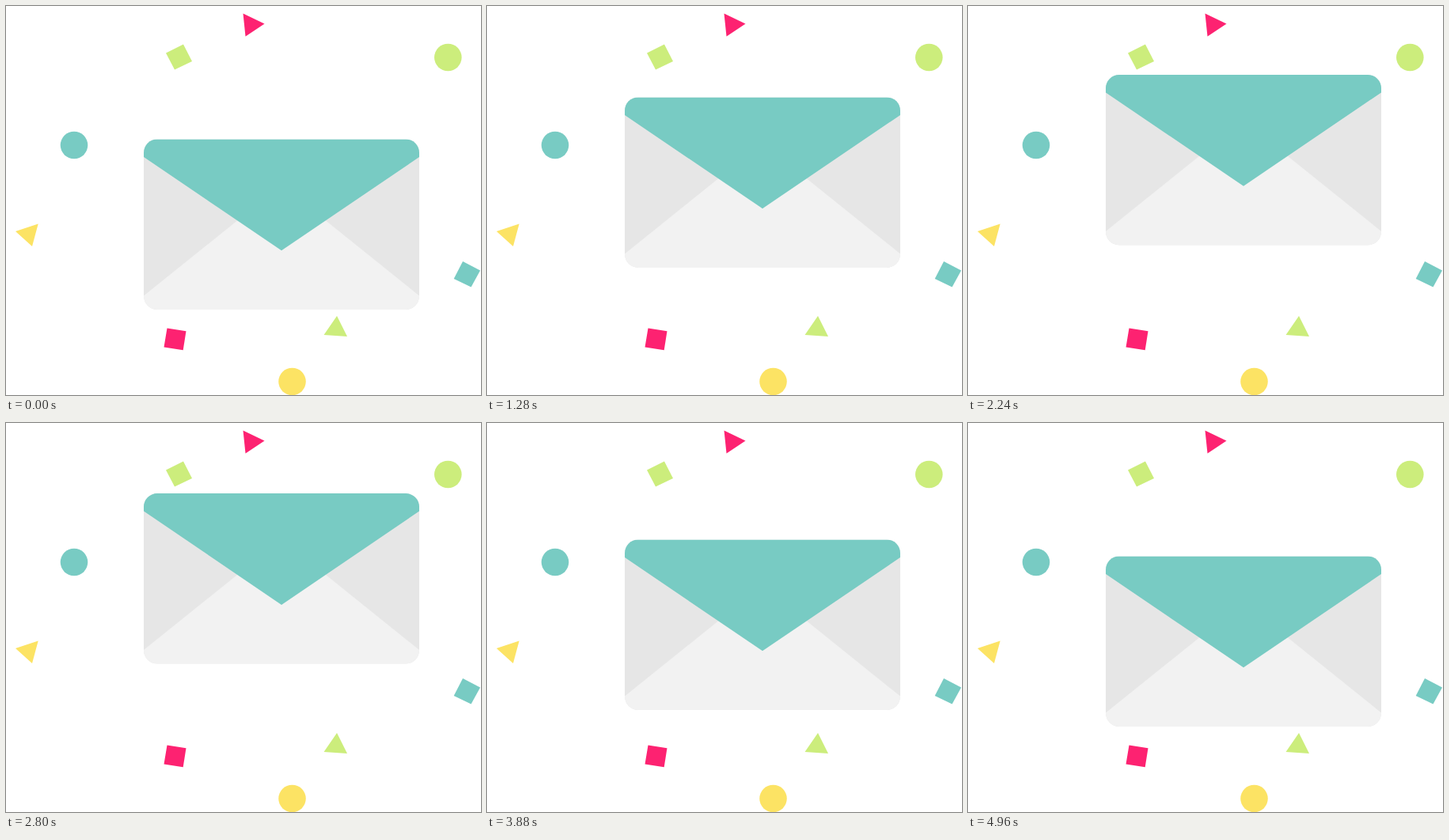
Recreate the animation shown at these times as an HTML page. Size 600 px wide and 492 px high, loop 5 s.

```html
<!DOCTYPE html>
<html lang="en">
<head>
<meta charset="utf-8">
<title>Floating envelope</title>
<style>
  html, body { margin: 0; width: 100%; height: 100%; overflow: hidden; background: #fff; }
  svg { display: block; width: 600px; height: 492px; }
  .teal { fill: #78cbc3; }
  .lime { fill: #cced7c; }
  .pink { fill: #fd2271; }
  .yellow { fill: #fce364; }
</style>
</head>
<body>
<svg viewBox="0 0 600 492">
  <defs>
    <clipPath id="body"><rect width="348" height="215.5" rx="17"/></clipPath>
  </defs>

  <polygon class="pink" points="299.5,9.5 326.5,22.5 302.5,38.5"/>
  <polygon class="lime" points="224,48.5 235,70 213,80.5 202,59.5"/>
  <circle class="lime" cx="558.3" cy="65" r="17.3"/>
  <circle class="teal" cx="86" cy="176" r="17.3"/>
  <polygon class="yellow" points="12,285 40.7,275.5 33,304"/>
  <polygon class="teal" points="577,323 599,334.5 587.5,355.5 565.7,345"/>
  <polygon class="pink" points="203.5,407.5 227.5,411.3 223.7,435.3 199.5,431.5"/>
  <polygon class="lime" points="418,392 431,418 401.5,416"/>
  <circle class="yellow" cx="361.5" cy="475" r="17.3"/>

  <g id="envelope">
    <g clip-path="url(#body)">
      <rect width="348" height="215.5" fill="#e6e6e6"/>
      <path d="M0 198L174 58L348 198V216H0Z" fill="#f2f2f2"/>
      <path class="teal" d="M0 0H348V22.5L174 140.8L0 22.5Z"/>
    </g>
  </g>
</svg>
<script>
  const LOOP = 5000, LOW = 168.5, HIGH = 86.3;
  const envelope = document.getElementById('envelope');

  const bezier = (a, b, s) => 3 * (1 - s) ** 2 * s * a + 3 * (1 - s) * s * s * b + s ** 3;

  // Cubic-bezier easing, solved for its parameter by bisection.
  function ease(x) {
    if (x <= 0) return 0;
    if (x >= 1) return 1;
    let lo = 0, hi = 1;
    for (let i = 0; i < 24; i++) {
      const mid = (lo + hi) / 2;
      if (bezier(0.55, 0.33, mid) < x) lo = mid; else hi = mid;
    }
    return bezier(0.055, 1, lo);
  }

  function draw(now) {
    const t = now % LOOP;
    const lift = t < 2480 ? ease((t - 40) / 2440) : 1 - ease((t - 2480) / 2500);
    const y = LOW + (HIGH - LOW) * lift;
    envelope.setAttribute('transform', `translate(174 ${y.toFixed(2)})`);
  }

  function tick() {
    draw(performance.now());
    requestAnimationFrame(tick);
  }
  tick();
</script>
</body>
</html>
```
